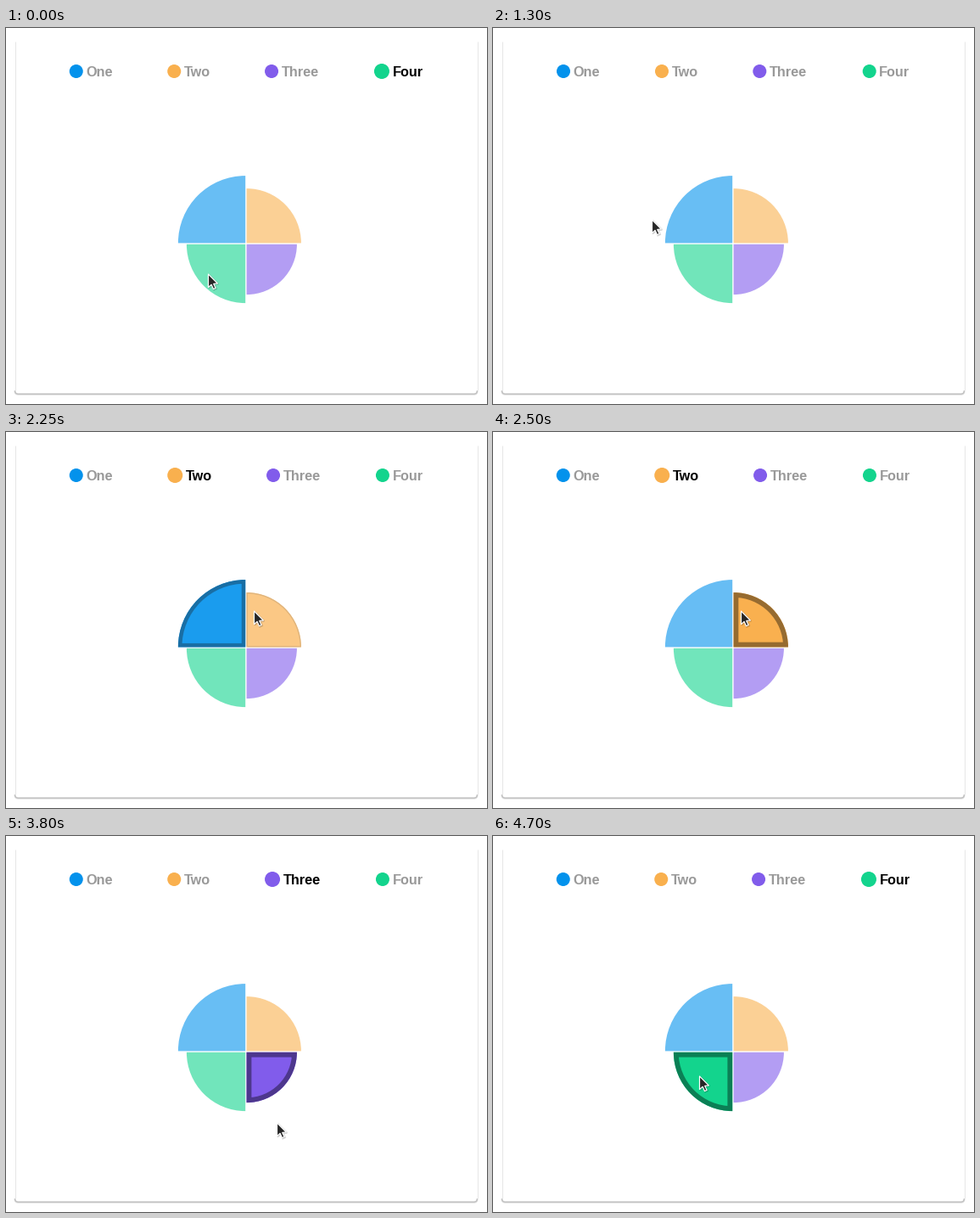
Recreate the animation shown at these times as a matplotlib script. Size 567x443 px, loop 4.75 s.

```python
import numpy as np
import matplotlib.pyplot as plt
from matplotlib.animation import FuncAnimation
from matplotlib.colors import to_rgb
from matplotlib.patches import Circle, PathPatch, Polygon, Wedge
from matplotlib.path import Path

WIDTH, HEIGHT, DPI = 567, 443, 72
STEP, LOOP = 50, 4750
FADE = 400
CENTER = np.array([282.9, 254.1])
GAP = 0.7
BORDER = 5.8
LEGEND_LEFT, LEGEND_GAP, LEGEND_Y = 75, 65, 51
WHITE = np.ones(3)

# label, colour, slice radius, legend text width
ITEMS = [
    ("One", "#0392ec", 80, 31),
    ("Two", "#f9b04e", 65, 30.3),
    ("Three", "#815ceb", 60, 44.4),
    ("Four", "#13d48d", 70, 35),
]

# Hovered item from each time on, in ms
HOVERS = [(0, 3), (1000, None), (1400, 0), (2225, 1), (2925, 2),
          (3850, None), (4350, 3)]

# Pointer moves: start, end, and the point reached
START = (239, 290)
MOVES = [
    (0, 200, (241, 284)), (650, 1050, (180, 252)), (1050, 1300, (188, 226)),
    (1300, 1600, (240, 238)), (2100, 2250, (293, 211)),
    (2850, 2950, (310, 278)), (3000, 3800, (320, 338)),
    (4000, 4400, (244, 283)),
]
ARROW = np.array([(0, 0), (0, 15.6), (3.6, 12.3), (6, 17.6),
                  (8.6, 16.4), (6.2, 11.4), (10.9, 11)])


def mix(a, b, amount):
    return a + (b - a) * amount


def progress(t, start, end):
    return np.clip((t - start) / (end - start), 0, 1)


def ease_out_quart(x):
    return 1 - (1 - x) ** 4


def smooth(x):
    return x * x * (3 - 2 * x)


def hovered(t):
    return [index for start, index in HOVERS if start <= t][-1]


def hover_level(index, t):
    level = 0
    for start, current in HOVERS:
        level = mix(level, float(current == index),
                    ease_out_quart(progress(t, start, start + FADE)))
    return level


def pointer_tip(t):
    tip = np.array(START, float)
    for start, end, goal in MOVES:
        tip = mix(tip, np.array(goal), smooth(progress(t, start, end)))
    return np.round(tip) + (-0.5, 0)


fig = plt.figure(figsize=(WIDTH / DPI, (HEIGHT + 1e-6) / DPI), dpi=DPI,
                 facecolor="white")
ax = fig.add_axes([0, 0, 1, 1])
ax.set_xlim(0, WIDTH)
ax.set_ylim(HEIGHT, 0)
ax.axis("off")


def add_card():
    left, right, top, bottom, r = 10.5, 555.5, 16, 431, 4
    for x in (left, right):
        ax.plot([x, x], [top, bottom - r], color="#e6e6e6", lw=1,
                solid_capstyle="butt")
    codes = [Path.MOVETO, Path.CURVE3, Path.CURVE3, Path.LINETO,
             Path.CURVE3, Path.CURVE3]
    for shift, color, width in ((0.8, "#e4e4e4", 2), (0.2, "#c2c2c2", 1.5)):
        y = bottom + shift
        points = [(left, y - r), (left, y), (left + r, y),
                  (right - r, y), (right, y), (right, y - r)]
        ax.add_patch(PathPatch(Path(points, codes), fc="none", ec=color,
                               lw=width, capstyle="butt"))


class Slice:
    def __init__(self, index, color, radius):
        self.index, self.color = index, np.array(to_rgb(color))
        angle = 180 + 90 * index
        middle = np.radians(angle + 45)
        center = CENTER + GAP * np.sign([np.cos(middle), np.sin(middle)])
        shape = (center, radius - GAP, angle, angle + 90)
        self.fill = ax.add_patch(Wedge(*shape, lw=0))
        self.border = ax.add_patch(Wedge(*shape, fc="none",
                                         joinstyle="miter"))
        self.border.set_clip_path(self.fill)

    def update(self, t):
        level = hover_level(self.index, t)
        opacity = 0.6 + 0.4 * level
        edge = mix(self.color, self.color * 0.6, level ** 0.6)
        self.fill.set_facecolor(mix(WHITE, self.color, opacity))
        self.border.set_edgecolor(mix(WHITE, edge, opacity))
        # Half of the line is clipped away.
        self.border.set_linewidth(2 * BORDER * level)
        self.border.set_visible(level > 0.01)


class LegendItem:
    def __init__(self, index, label, color, left):
        self.index, self.left = index, left
        self.dot = ax.add_patch(Circle((left, LEGEND_Y), 8, fc=color, lw=0))
        self.text = ax.text(left, LEGEND_Y + 6, label,
                            family="Liberation Sans", weight="bold",
                            size=16.3, va="baseline")

    def update(self, active):
        # An active entry is 2 px wider and the free space is shared out.
        left, chosen = self.left, self.index == active
        if active is not None:
            left += 2 * (self.index > active) - 0.25 * (2 * self.index + 1)
        radius = 9 if chosen else 8
        self.dot.set_radius(radius)
        self.dot.center = (left + radius, LEGEND_Y)
        self.text.set_x(left + 2 * radius + 3.5)
        self.text.set_color("black" if chosen else "#999999")


add_card()
parts, legend = [], []
left = LEGEND_LEFT
for i, (label, color, radius, text_width) in enumerate(ITEMS):
    parts.append(Slice(i, color, radius))
    legend.append(LegendItem(i, label, color, left))
    left += 20 + text_width + LEGEND_GAP
shadow = ax.add_patch(Polygon(ARROW, fc="black", ec="black", lw=2,
                              alpha=0.16, zorder=5))
arrow = ax.add_patch(Polygon(ARROW, fc="#262626", ec="white", lw=1.2,
                             joinstyle="round", zorder=6))


def update(frame):
    t = frame * STEP
    for part in parts:
        part.update(t)
    for entry in legend:
        entry.update(hovered(t))
    tip = pointer_tip(t)
    arrow.set_xy(ARROW + tip)
    shadow.set_xy(ARROW + tip + 0.8)
    return []


animation = FuncAnimation(fig, update, frames=LOOP // STEP, interval=STEP,
                          init_func=lambda: update(0), repeat=True,
                          repeat_delay=0, blit=False)
plt.show()
```
